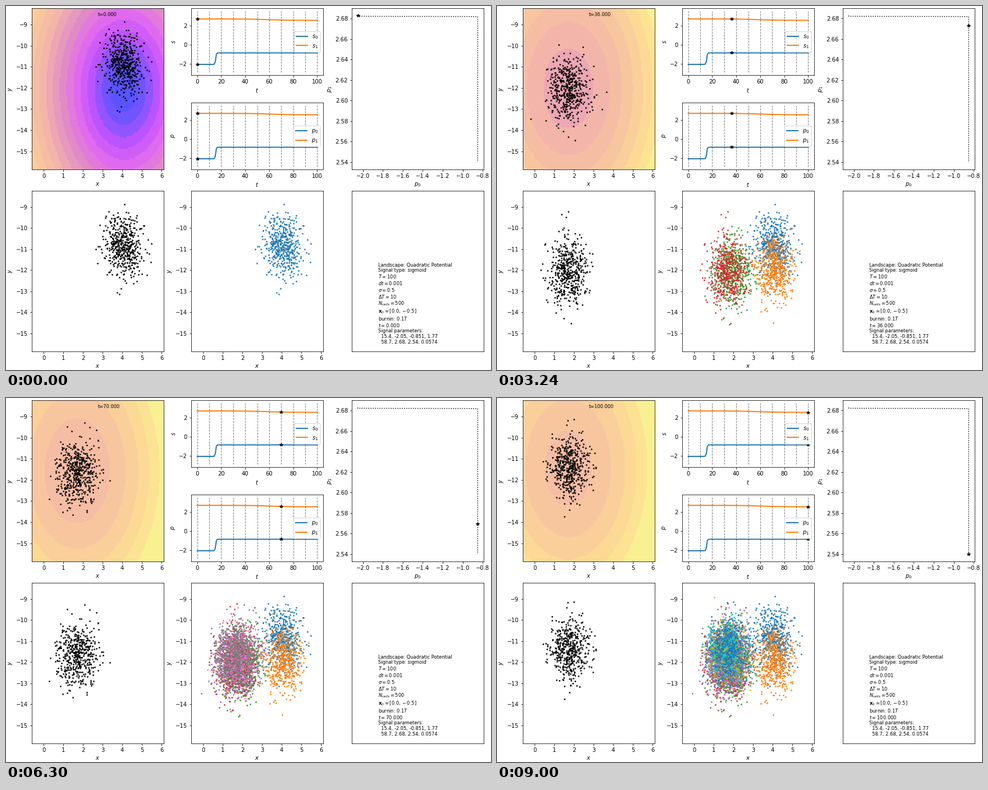
Write a matplotlib script that moves like this. It is 864 px wide and 648 px high and loops after 9.09 s.

```python
import numpy as np
import matplotlib.pyplot as plt
from matplotlib.animation import FuncAnimation
from matplotlib.colors import LinearSegmentedColormap

W, H = 864, 648
T, SNAP, CELLS, SIGMA = 100, 10, 500, 0.5
STEPS = 20
XLIM, YLIM = (-0.6, 6.114), (-15.86, -8.23)
STIFF = np.array([1 / 2, 2 / 9])

# Flat bands of the potential, widening with height above the lowest value
V_MIN, V_SPAN = -20.4, 10
k = np.arange(17)
EDGES = 0.1 * k + 0.03 * k**2
ramp = LinearSegmentedColormap.from_list("ramp", [
    (0, "#5454ff"), (0.08, "#c855ff"), (0.15, "#e26cee"), (0.24, "#e08ac8"),
    (0.43, "#f3b5aa"), (0.78, "#fdda94"), (1, "#f9f092")])
BANDS = ramp(np.append((EDGES[:-1] + EDGES[1:]) / 2, V_SPAN) / V_SPAN)

INFO = r"""Landscape: Quadratic Potential
Signal type: sigmoid
$T=100$
$dt=0.001$
$\sigma=0.5$
$\Delta T=10$
$N_{cells}=500$
$\mathbf{x}_0=[0.0, -0.5]$
burnin: $0.1T$
$t=%.3f$
Signal parameters:
  15.4, -2.05, -0.851, 1.77
  58.7, 2.68, 2.54, 0.0574"""


def sigmoid(t, tc, start, end, rate):
    return start + (end - start) * 0.5 * (1 + np.tanh(rate * (t - tc)))


def signal(t):
    return np.array([sigmoid(t, 15.38, -2.05, -0.851, 1.77),
                     sigmoid(t, 58.7, 2.683, 2.5388, 0.0574)])


def simulate():
    """Cell positions at every whole time, after a burn-in at t=0."""
    rng = np.random.default_rng(12)
    dt = 1 / STEPS
    pos = np.tile([0.0, -0.5], (CELLS, 1))
    out = []
    for step in range(-T // 10 * STEPS, T * STEPS + 1):
        if step >= 0 and step % STEPS == 0:
            out.append(pos.copy())
        drift = -(STIFF * pos + signal(max(step, 0) * dt))
        pos = pos + drift * dt + SIGMA * np.sqrt(dt) * rng.normal(size=pos.shape)
    return out


gx, gy = np.meshgrid(np.linspace(*XLIM, 100), np.linspace(*YLIM, 100))


def landscape(p):
    v = gx**2 / 4 + gy**2 / 9 + p[0] * gx + p[1] * gy
    return BANDS[np.digitize(v - V_MIN, EDGES[1:])]


fig = plt.figure(figsize=(W / 72, H / 72), dpi=72, facecolor="white")


def panel(left, top, bottom, xlabel="", ylabel=""):
    """Axes whose frame lies on the given pixel columns and rows."""
    ax = fig.add_axes([left / W, 1 - (bottom + 1) / H,
                       235 / W, (bottom - top) / H])
    ax.set_xlabel(xlabel)
    ax.set_ylabel(ylabel)
    return ax


def cell_panel(left, top, bottom):
    ax = panel(left, top, bottom, "$x$", "$y$")
    ax.set(xlim=XLIM, ylim=YLIM)
    return ax


def dots(ax, pos, color="k"):
    return ax.plot(*pos.T, ".", color=color, ms=6, mew=0, alpha=0.85)[0]


def star(ax):
    return ax.plot([], [], "k*", ms=6, ls="none")[0]


def note(ax, y, **style):
    return ax.text(*y, "", transform=ax.transAxes, fontsize="small", **style)


times = np.arange(T + 1)
path = signal(times)
cells = simulate()


def signal_panel(top, bottom, name):
    ax = panel(330, top, bottom, "$t$", f"${name}$")
    for i in range(2):
        ax.plot(times, path[i], lw=2, label=f"${name}_{i}$")
    ax.vlines(times[::SNAP], path.min() - 0.8, path.max() + 0.8,
              colors="k", linestyles="--", lw=1, alpha=0.5)
    ax.legend(loc="center right")
    return star(ax)


ax_land = cell_panel(46, 3, 290)
image = ax_land.imshow(landscape(path[:, 0]), extent=XLIM + YLIM, origin="lower",
                       aspect="auto", interpolation="nearest")
live = dots(ax_land, cells[0])
clock = note(ax_land, (0.5, 0.95))

signal_stars = [signal_panel(3, 122, "s"), signal_panel(171, 290, "p")]

ax_path = panel(616, 3, 290, "$p_0$", "$p_1$")
ax_path.plot(*path, "k:")
path_star = star(ax_path)

last = dots(cell_panel(46, 328, 614), cells[0])

ax_all = cell_panel(330, 328, 614)
snaps = [dots(ax_all, pos, f"C{i % 10}") for i, pos in enumerate(cells[::SNAP])]

ax_info = panel(616, 328, 614)
ax_info.set(xticks=[], yticks=[])
info = note(ax_info, (0.2, 0.05), linespacing=1.1)


def update(t):
    p = path[:, t]
    image.set_data(landscape(p))
    live.set_data(*cells[t].T)
    clock.set_text(f"t={t:.3f}")
    for s in signal_stars:
        s.set_data([t, t], p)
    path_star.set_data(p[:1], p[1:])
    last.set_data(*cells[t // SNAP * SNAP].T)
    for i, snap in enumerate(snaps):
        snap.set_visible(t >= i * SNAP)
    info.set_text(INFO % t)
    return []


anim = FuncAnimation(fig, update, frames=T + 1, interval=90,
                     repeat=True, repeat_delay=0)
plt.show()
```
